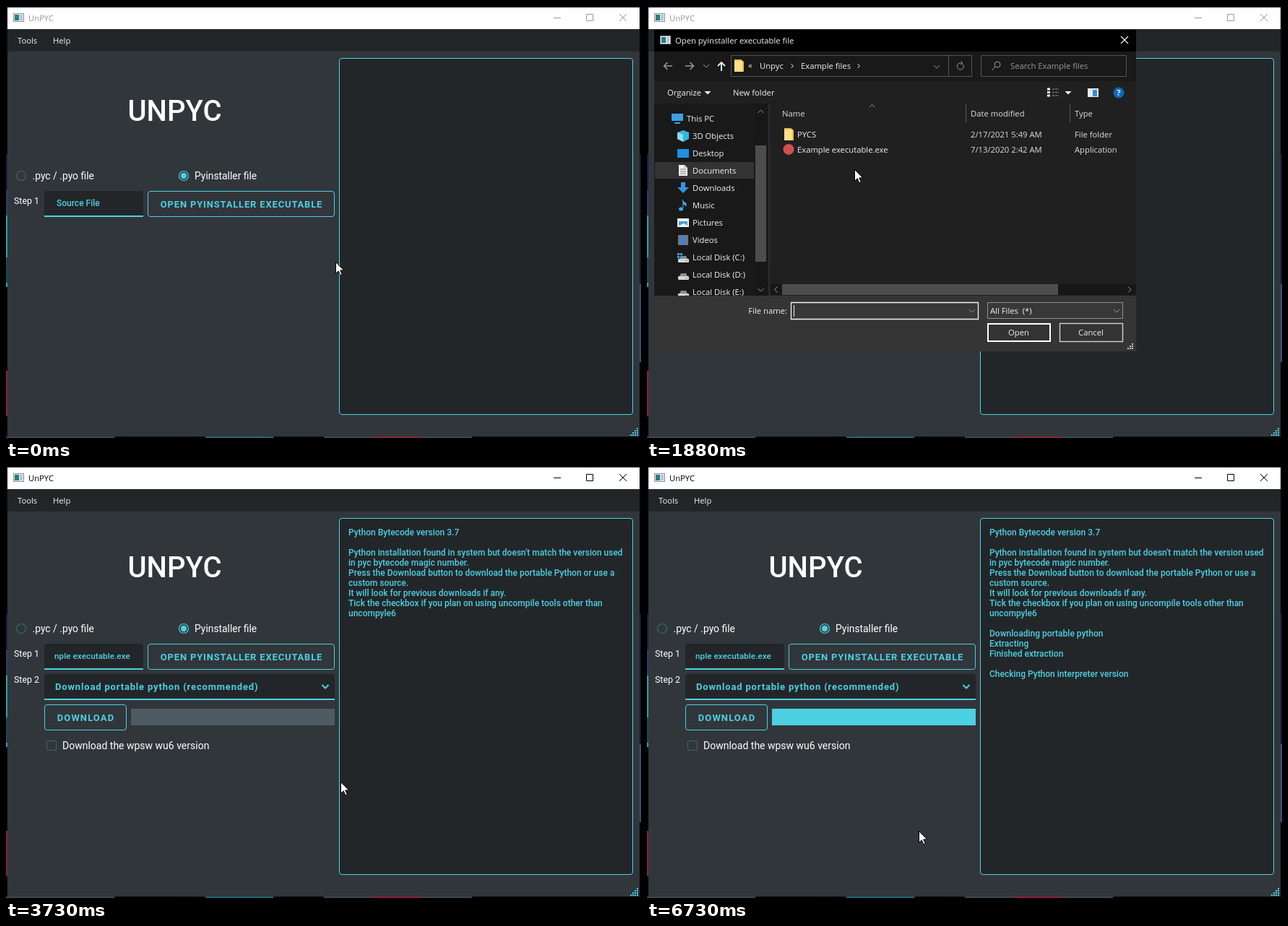
These frames come from a looping animation (879 by 598 pixels, 8 s). An HTML page:

```html
<!DOCTYPE html>
<html lang="en">
<head>
<meta charset="utf-8">
<title>UnPYC</title>
<style>
html, body { margin: 0; width: 100%; height: 100%; overflow: hidden; background: #04070d; }
svg { display: block; width: 879px; height: 598px; }
text { white-space: pre; fill: currentColor; }
.app { font: 14px Roboto, sans-serif; color: #fff; }
.win { font: 11.25px "Open Sans", "Noto Sans", sans-serif; color: #f2f2f2; }
.cy { color: #4dd0e1; }
.btn { font-weight: 700; font-size: 13px; letter-spacing: .83px; text-anchor: middle; }
.med { font-weight: 500; font-size: 12px; }
.step { font-size: 12.4px; }
.logo { font-weight: 500; font-size: 40px; text-anchor: middle; }
.line { fill: none; stroke: currentColor; }
.dim { color: #999; }
.mid { text-anchor: middle; }
.end { text-anchor: end; }

/* One 8 s clock; 1% = 80 ms */
.anim { animation: 8s step-end infinite; }
.title { animation-name: title; }
.logo { animation-name: logoY; }
.top { animation-name: topY; }
.before { animation-name: before; }
.after { animation-name: after; }
.dialog { animation-name: dialog; transform-origin: 343.5px 255.5px; }
.early { animation-name: early; }
.late { animation-name: late; }
.row { animation-name: row; }
.picked { animation-name: picked; }
.unpicked { animation-name: unpicked; }
.open { animation-name: open; }
.press1 { animation-name: press1; }
.press2 { animation-name: press2; }
.ink1 { animation-name: ink1; }
.ink2 { animation-name: ink2; }
.msg1 { animation-name: msg1; }
.msg2 { animation-name: msg2; }
.msg3 { animation-name: msg3; }
.msg4 { animation-name: msg4; }
.bar { animation-name: bar; }
.cursor { animation-name: cursor; }

@keyframes title { 0%, 11.75% { color: #999 } 1%, 40.75%, 100% { color: #000 } }
@keyframes logoY { 0% { transform: translateY(5px) } 41.125%, 100% { transform: none } }
@keyframes topY { 0% { transform: translateY(10px) } 41.125%, 100% { transform: none } }
@keyframes before { 0% { opacity: 1 } 41.125%, 100% { opacity: 0 } }
@keyframes after { 0% { opacity: 0 } 41.125%, 100% { opacity: 1 } }
@keyframes dialog {
  0% { opacity: 0; transform: scale(.96) }
  15.25% { opacity: .3; transform: scale(.96) }
  16.5% { opacity: .82; transform: scale(.991) }
  17.625% { opacity: 1; transform: none }
  38.625%, 100% { opacity: 0; transform: none }
}
@keyframes early { 0% { opacity: 1 } 18.75%, 100% { opacity: 0 } }
@keyframes late { 0% { opacity: 0 } 18.75%, 100% { opacity: 1 } }
@keyframes row {
  0% { fill: #202020 } 23.6% { fill: #4d4d4d } 25.94% { fill: #777 }
  35.19%, 100% { fill: #333 }
}
@keyframes picked { 0% { opacity: 0 } 25.94%, 100% { opacity: 1 } }
@keyframes unpicked { 0% { opacity: 1 } 25.94%, 100% { opacity: 0 } }
@keyframes open { 0% { fill: #333 } 32.81%, 36.375%, 100% { fill: #454545 } 35.19% { fill: #666 } }
@keyframes press1 { 0%, 10.56%, 100% { fill: transparent } 9.375% { fill: #4dd0e1 } }
@keyframes ink1 { 0%, 10.56%, 100% { color: #4dd0e1 } 9.375% { color: #232629 } }
@keyframes press2 { 0%, 53.69%, 100% { fill: transparent } 52.5% { fill: #4dd0e1 } }
@keyframes ink2 { 0%, 53.69%, 100% { color: #4dd0e1 } 52.5% { color: #232629 } }
@keyframes msg1 { 0% { opacity: 0 } 54.875%, 100% { opacity: 1 } }
@keyframes msg2 { 0% { opacity: 0 } 61.75%, 100% { opacity: 1 } }
@keyframes msg3 { 0% { opacity: 0 } 82.96%, 100% { opacity: 1 } }
@keyframes msg4 { 0% { opacity: 0 } 84.125%, 100% { opacity: 1 } }
@keyframes bar {
  0% { width: 0 } 58.375% { width: 70px } 59.5% { width: 180px } 60.625% { width: 282px }
  68.75% { width: 0; animation-timing-function: steps(8) }
  78.25% { width: 47px } 79.5% { width: 95px } 80.66% { width: 160px } 81.81% { width: 225px }
  82.96%, 100% { width: 282px }
}
@keyframes cursor {
  0% { transform: translate(456px, 354px) }
  3.625% { transform: translate(428px, 337px) }
  4.8% { transform: translate(370px, 303px) }
  5.95% { transform: translate(333px, 281px) }
  7.125% { transform: translate(323px, 275px) }
  21.25% { transform: translate(315px, 262px) }
  22.42% { transform: translate(287px, 226px) }
  23.6% { transform: translate(268px, 204px) }
  24.77% { transform: translate(262px, 197px) }
  28.28% { transform: translate(330px, 256px) }
  29.45% { transform: translate(430px, 345px) }
  30.625% { transform: translate(496px, 412px) }
  31.625% { transform: translate(509px, 420px) }
  32.81% { transform: translate(512px, 441px) }
  34% { transform: translate(513px, 453px) }
  38.625% { transform: translate(512px, 444px) }
  46.625% { transform: translate(463px, 437px) }
  47.8% { transform: translate(330px, 396px) }
  48.97% { transform: translate(200px, 356px) }
  50.15% { transform: translate(150px, 345px) }
  51.3% { transform: translate(142px, 344px) }
  58.375% { transform: translate(156px, 356px) }
  59.5% { transform: translate(230px, 410px) }
  60.625% { transform: translate(335px, 480px) }
  61.75%, 100% { transform: translate(376px, 505px) }
}
</style>
</head>
<body>
<svg viewBox="0 0 879 598">
  <defs>
    <g id="appicon">
      <rect x=".5" y=".5" width="14" height="11" fill="#e8edf2" stroke="#8a949c"/>
      <rect x="2" y="2" width="6" height="8" fill="#2b7a86"/>
      <rect x="9" y="2" width="4" height="8" fill="#b9c6d2"/>
    </g>
    <g id="folder">
      <path d="M0 0h9l4 3v14H0z" fill="#e9bd4b"/>
      <path d="M0 2h11v15H0z" fill="#ffdf87"/>
    </g>
    <g id="disk">
      <path d="M2 5L4 1h7l2 4z" fill="#8c8c8c"/>
      <rect y="5" width="15" height="5" rx="1" fill="#d6d6d6"/>
      <rect x="10" y="7" width="3" height="1" fill="#4b8"/>
    </g>
    <g id="page">
      <path d="M0 0h8l4 4v11H0z" fill="#f2f2f2"/>
      <path d="M8 0v4h4" fill="none" stroke="#aaa"/>
    </g>
    <path id="down" class="line" d="M-4-2L0 2 4-2"/>
    <path id="right" class="line" d="M-1.500-3L1.500 0-1.500 3"/>
    <path id="drop" d="M-4.500-2h9L0 2.500z" fill="currentColor"/>
    <path id="grip" class="line" stroke-width="2" stroke-dasharray="2 1" d="M6 0h2M3 3h5M0 6h8"/>
    <clipPath id="tree"><path d="M10 135h140v266H10z"/></clipPath>
  </defs>

  <!-- desktop showing at the edges -->
  <rect width="879" height="598" fill="#04070d"/>
  <g stroke-width="2" fill="none">
    <path d="M1 205v50" stroke="#1a1d48"/>
    <path d="M1 255v35" stroke="#29406f"/>
    <path d="M1 290v58M1 383v6" stroke="#2aa0ae"/>
    <path d="M1 348v35" stroke="#0c4d60"/>
    <path d="M1 505v63M508 597h67" stroke="#8d2038"/>
    <path d="M0 597h150M440 597h68M575 597h70" stroke="#3a4850"/>
    <path d="M276 597h94" stroke="#1f6470"/>
    <path d="M878 205v180" stroke="#151a36"/>
    <path d="M878 385v108" stroke="#38507c"/>
  </g>

  <!-- main window -->
  <rect x="2" y="2" width="875" height="594" fill="#31363b"/>
  <rect x="2" y="2" width="875" height="30" fill="#fff"/>
  <rect x="2" y="32" width="875" height="31" fill="#232629"/>
  <use href="#appicon" x="10" y="10"/>
  <g class="win">
    <g class="anim title">
      <text x="31" y="21">UnPYC</text>
      <path class="line" d="M758 16.500h10M803.500 11.500h9v9h-9zM849 11l10 10M859 11l-10 10"/>
    </g>
    <text x="16" y="52">Tools</text>
    <text x="65" y="52">Help</text>
  </g>

  <g class="app">
    <text class="anim logo" x="233.500" y="154">UNPYC</text>
    <rect class="line cy" x="461.500" y="72.500" width="406" height="493" rx="3.500" style="fill:#232629"/>
    <path class="line cy" d="M873 585h2M870 588h5M867 591h8M864 594h11" stroke-width="2" stroke-dasharray="2 1"/>

    <g class="anim top">
      <circle class="line" cx="21" cy="225" r="6.500" stroke-width="1.200" style="color:#366872"/>
      <text x="36.500" y="230" font-size="13.900">.pyc / .pyo file</text>
      <g class="cy">
        <circle class="line" cx="246" cy="225" r="6.500" stroke-width="1.200"/>
        <circle cx="246" cy="225" r="4.200" fill="currentColor"/>
      </g>
      <text x="261" y="230" font-size="13.850">Pyinstaller file</text>
      <text class="step" x="11" y="264">Step 1</text>
      <path d="M53 282v-32q0-4 4-4h129q4 0 4 4v32z" fill="#232629"/>
      <path d="M53 281h137" stroke="#4dd0e1" stroke-width="2"/>
      <g class="cy med">
        <text class="anim before" x="70" y="267">Source File</text>
        <text class="anim after" x="67" y="267" font-size="11.800">nple executable.exe</text>
      </g>
      <g class="cy">
        <rect class="line anim press1" x="196.500" y="246.500" width="258" height="35" rx="3.500"/>
        <text class="btn anim ink1" x="326" y="269">OPEN PYINSTALLER EXECUTABLE</text>
      </g>
    </g>

    <g class="anim after">
      <text class="step" x="11" y="300">Step 2</text>
      <path d="M53 324v-32q0-4 4-4h394q4 0 4 4v32z" fill="#232629"/>
      <path d="M53 323h402" stroke="#4dd0e1" stroke-width="2"/>
      <g class="cy">
        <text class="btn" x="68" y="310" style="text-anchor:start">Download portable python (recommended)</text>
        <path class="line" d="M437.500 303l4.500 4.500 4.500-4.500" stroke-width="2"/>
        <rect class="line anim press2" x="53.500" y="330.500" width="113" height="35" rx="3.500"/>
        <text class="btn anim ink2" x="110.500" y="353" style="letter-spacing:1.1px">DOWNLOAD</text>
      </g>
      <rect x="173" y="336" width="282" height="23" fill="#4f5b62"/>
      <rect class="anim bar" x="173" y="336" width="0" height="23" fill="#4dd0e1"/>
      <rect class="line" x="56.500" y="380.500" width="13" height="13" rx="1.500" style="color:#366872"/>
      <text x="78" y="392">Download the wpsw wu6 version</text>
      <g class="cy med">
        <text y="96">
          <tspan x="474">Python Bytecode version 3.7</tspan>
          <tspan x="474" dy="28">Python installation found in system but doesn't match the version used</tspan>
          <tspan x="474" dy="14">in pyc bytecode magic number.</tspan>
          <tspan x="474" dy="14">Press the Download button to download the portable Python or use a</tspan>
          <tspan x="474" dy="14">custom source.</tspan>
          <tspan x="474" dy="14">It will look for previous downloads if any.</tspan>
          <tspan x="474" dy="14">Tick the checkbox if you plan on using uncompile tools other than</tspan>
          <tspan x="474" dy="14">uncompyle6</tspan>
        </text>
        <text class="anim msg1" x="474" y="236">Downloading portable python</text>
        <text class="anim msg2" x="474" y="250">Extracting</text>
        <text class="anim msg3" x="474" y="264">Finished extraction</text>
        <text class="anim msg4" x="474" y="292">Checking Python interpreter version</text>
      </g>
    </g>
  </g>

  <!-- file dialog -->
  <g class="win anim dialog">
    <rect x="10" y="33" width="667" height="445" fill="#202020"/>
    <rect x="10" y="33" width="667" height="30" fill="#000"/>
    <rect x="10" y="63" width="667" height="41" fill="#191919"/>
    <rect x="10" y="135" width="159" height="266" fill="#191919"/>
    <rect x="10" y="401" width="667" height="77" fill="#353535"/>
    <use href="#appicon" x="18" y="41"/>
    <text x="39" y="52">Open pyinstaller executable file</text>
    <path class="line" d="M656 42l10 10M666 42l-10 10" stroke-width="1.300"/>

    <!-- navigation -->
    <g class="dim">
      <path class="line" d="M35 83H23.500m5-5l-5 5 5 5M53 83h11.500m-5-5l5 5-5 5" stroke-width="1.500"/>
      <use href="#down" x="82" y="83"/>
      <use href="#down" x="401" y="84"/>
      <path class="line" d="M437.500 81a4.500 4.500 0 1 1-4-2h3m-2-2l2.500 2-2.500 2.500"/>
      <circle class="line" cx="485" cy="81" r="4"/>
      <path class="line" d="M482 84l-4.500 5"/>
      <text x="503" y="87">Search Example files</text>
    </g>
    <path class="line" d="M103 90V78m-5 5l5-5 5 5" stroke-width="1.800"/>
    <path d="M116.500 68.500h333v29h-333zM417.500 69v28M462.500 68.500h201v29h-201z" fill="none" stroke="#535353"/>
    <use href="#folder" x="121" y="74"/>
    <text x="140" y="86">«</text>
    <g class="anim early">
      <text x="156" y="87">Python</text>
      <use href="#right" x="206" y="83"/>
      <text x="217" y="87">Unpyc</text>
      <use href="#right" x="262" y="83"/>
      <text x="273.500" y="87">Example files</text>
    </g>
    <g class="anim late">
      <text x="156" y="87">Unpyc</text>
      <use href="#right" x="201" y="83"/>
      <text x="213" y="87">Example files</text>
      <use href="#right" x="293" y="83"/>
      <text x="28" y="124">Organize</text>
      <use href="#drop" x="84" y="120"/>
      <text x="119" y="124">New folder</text>
      <path class="line" d="M554 115h4M554 119.500h4M554 124h4" stroke-width="3"/>
      <path class="line dim" d="M561 115h9M561 119.500h9M561 124h9" stroke-dasharray="3 1"/>
      <use href="#drop" x="583" y="120"/>
    </g>
    <rect x="610" y="114" width="15" height="12" fill="#e8e8e8"/>
    <rect x="617" y="116" width="6" height="9" fill="#2f8fe0"/>
    <circle cx="653" cy="120" r="7.500" fill="#1167b8"/>
    <text class="mid" x="653" y="124" font-weight="700">?</text>

    <!-- places -->
    <g clip-path="url(#tree)">
      <rect x="11" y="216" width="137" height="23" fill="#333"/>
      <path d="M34 149h16v10H34zM38 161h8v2h-8z" fill="#3aa0e8"/>
      <path d="M42 175l8-3 8 3v9l-8 4-8-4z" fill="#35b5dc"/>
      <path d="M42 175l8 3v10l-8-4z" fill="#8fdcf2"/>
      <rect x="42" y="198" width="16" height="12" fill="#1e90e0"/>
      <use href="#page" x="44" y="220"/>
      <path class="line" d="M46 226h8M46 229h8M46 232h8" style="color:#678"/>
      <path d="M47 244h6v7h5l-8 8-8-8h5z" fill="#3594e0"/>
      <path d="M49 268q1 4 5 5v4q-2-3-4-3v6" fill="#3aa7f0" stroke="#3aa7f0"/>
      <ellipse cx="47" cy="281" rx="3" ry="2.500" fill="#3aa7f0"/>
      <rect x="42" y="294" width="16" height="12" fill="#eef4f8"/>
      <path d="M44 304v-6h12v6l-5-3z" fill="#4a9fd8"/>
      <rect x="43" y="317" width="14" height="14" fill="#777"/>
      <path d="M46 318h8v5h-8zM46 325h8v5h-8z" fill="#3a83d6"/>
      <use href="#disk" x="43" y="345"/>
      <path d="M42 342h3v3h-3zM46 342h3v3h-3zM42 346h3v3h-3zM46 346h3v3h-3z" fill="#31a8ee"/>
      <use href="#disk" x="43" y="369"/>
      <use href="#disk" x="43" y="393"/>
      <text x="55" y="160">This PC</text>
      <text y="184">
        <tspan x="63">3D Objects</tspan>
        <tspan x="63" dy="24">Desktop</tspan>
        <tspan x="63" dy="24">Documents</tspan>
        <tspan x="63" dy="24">Downloads</tspan>
        <tspan x="63" dy="24">Music</tspan>
        <tspan x="63" dy="24">Pictures</tspan>
        <tspan x="63" dy="24">Videos</tspan>
        <tspan x="63" dy="24">Local Disk (C:)</tspan>
        <tspan x="63" dy="24">Local Disk (D:)</tspan>
        <tspan x="63" dy="24">Local Disk (E:)</tspan>
      </text>
    </g>
    <path d="M150 136h15v265h-15zM171 385h506v15H171z" fill="#171717"/>
    <path d="M150 193h15v161h-15zM187 385h382v15H187z" fill="#4d4d4d"/>
    <path d="M169 136v265" stroke="#2e2e2e" stroke-width="2"/>
    <g class="dim">
      <path class="line" d="M153.500 148l4-4 4 4M153.500 391l4 4 4-4M180.500 388.500l-4 4 4 4M666 388.500l4 4-4 4"/>
      <path class="line" d="M308 140l3.500-3.500 3.500 3.500"/>
    </g>

    <!-- file list -->
    <path d="M441.500 136v25M585.500 136v25" stroke="#5c5c5c"/>
    <g style="color:#dedede">
      <text x="187" y="153">Name</text>
      <text x="448" y="153">Date modified</text>
      <text x="592" y="153">Type</text>
    </g>
    <rect class="anim row" x="184" y="188" width="492" height="21" fill="#202020"/>
    <rect class="anim picked line" x="184.500" y="188.500" width="491" height="20" style="color:#8a8a8a"/>
    <use href="#folder" x="190" y="169"/>
    <use href="#page" class="anim early" x="190" y="191"/>
    <circle class="anim late" cx="196" cy="198.500" r="7.500" fill="#d2504c"/>
    <text x="208" y="182">PYCS</text>
    <text x="208" y="203">Example executable.exe</text>
    <g style="color:#dedede">
      <text x="448" y="182">2/17/2021 5:49 AM</text>
      <text x="448" y="203">7/13/2020 2:42 AM</text>
      <text x="592" y="182">File folder</text>
      <text x="592" y="203">Application</text>
    </g>

    <!-- name and buttons -->
    <text class="end" x="194" y="426">File name:</text>
    <path d="M199.500 410.500h259v23h-259zM471.500 410.500h187v22h-187z" fill="#383838" stroke="#8f8f8f"/>
    <g class="anim unpicked">
      <path class="line" d="M199.500 410.500h259v23h-259z" stroke-width="1.300"/>
      <path class="line" d="M203.500 414v16"/>
    </g>
    <text class="anim picked" x="203" y="427">Example executable.exe</text>
    <text x="475" y="426">All Files  (*)</text>
    <use href="#down" class="dim" x="449.500" y="422"/>
    <use href="#down" class="dim" x="650" y="422"/>
    <rect class="anim open" x="472" y="440" width="86" height="24" fill="#333" stroke="#fff" stroke-width="2"/>
    <rect x="571.500" y="439.500" width="87" height="25" fill="#333" stroke="#d0d0d0" stroke-width="1.400"/>
    <text class="mid" x="514.500" y="456">Open</text>
    <text class="mid" x="614.500" y="456">Cancel</text>
    <use href="#grip" x="665" y="468" style="color:#c4c4c4"/>
  </g>

  <path class="anim cursor" d="M.5.500v15.700l3.700-3.400 2.600 5.900 2.500-1.100-2.600-5.700h5z" fill="#fff" stroke="#000"/>
</svg>
</body>
</html>
```
